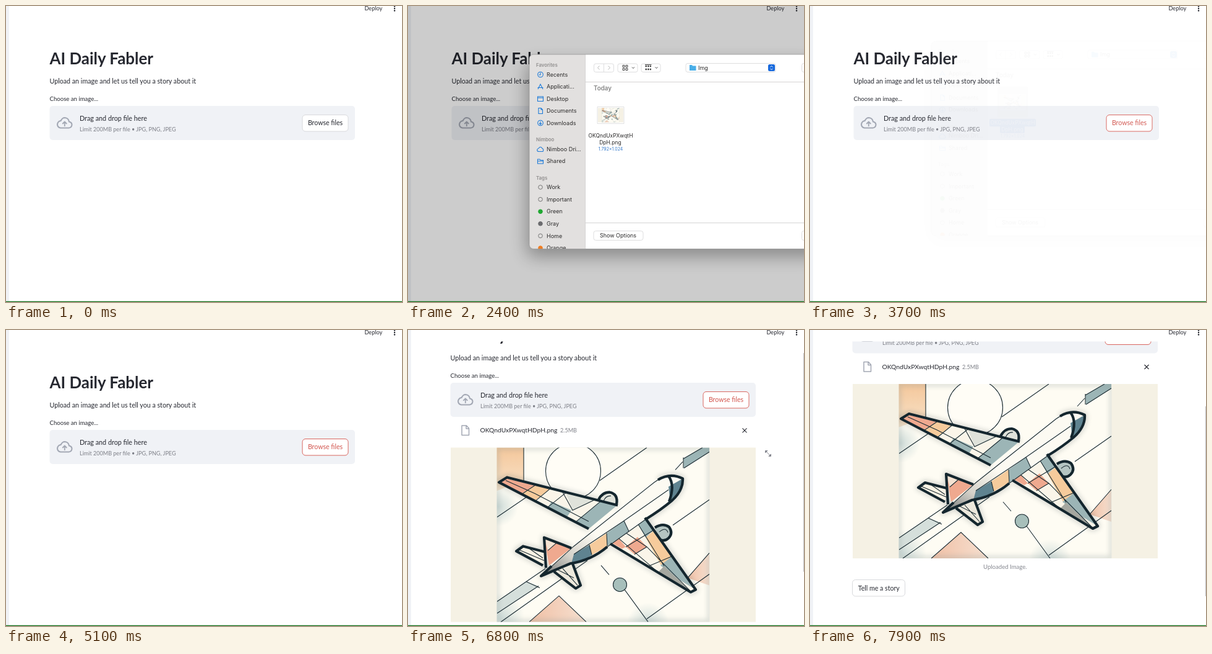
These frames come from a looping animation (640 px wide and 477 px high, 8 s). An HTML page:

```html
<!DOCTYPE html>
<html lang="en">
<head>
<meta charset="utf-8">
<style>
html, body { margin: 0; width: 100%; height: 100%; overflow: hidden; background: #fff }
svg { display: block; width: 640px; height: 477px; font: 10.8px Lato, sans-serif; fill: #262830 }
.small { font-size: 9.6px }
.hint { font-size: 9.05px; fill: #7d7f87 }
.mid { text-anchor: middle }
.finder { font: 9px Inter, sans-serif; fill: #2c2b2b }
.head { font-size: 7.8px; font-weight: 600; fill: #918f8f }
.line { fill: none; stroke: #1b2c33; stroke-width: 1.1 }
.edge { fill: none; stroke: #14262e; stroke-width: 4.2; stroke-linejoin: round }
.blue { fill: none; stroke: #1d7ad8; stroke-width: 1.1 }
.icon { fill: none; stroke: #a3a8b4; stroke-width: 1.8; stroke-linejoin: round }
.peach { fill: #efa98f } .sand { fill: #f6cb9c } .teal { fill: #9cb5b6 } .slate { fill: #5f8390 }
</style>
</head>
<body>
<svg viewBox="0 0 640 477">
<defs>
  <linearGradient id="sandFade" x2="0" y2="1"><stop stop-color="#f4c79b"/><stop offset="1" stop-color="#f8e3c9"/></linearGradient>
  <linearGradient id="peachFade" x2="1" y2="0"><stop stop-color="#f0c0a6"/><stop offset="1" stop-color="#f6e0d0"/></linearGradient>
  <linearGradient id="body" x1="0" y1="1" x2="1" y2="0"><stop stop-color="#6f7373"/><stop offset=".2" stop-color="#d5d2ca"/><stop offset=".4" stop-color="#fcfaf2"/></linearGradient>
  <radialGradient id="tealFade"><stop stop-color="#cfdcd9"/><stop offset="1" stop-color="#cfdcd9" stop-opacity="0"/></radialGradient>
  <filter id="soft" x="-20%" y="-20%" width="140%" height="140%"><feGaussianBlur stdDeviation="4"/></filter>
  <filter id="shade" x="-20%" y="-20%" width="140%" height="140%"><feGaussianBlur stdDeviation="14"/></filter>
  <clipPath id="frame"><path d="M143.500 190H487.500V471H143.500z"/></clipPath>
  <clipPath id="panel"><rect x="196" y="78" width="460" height="313.500" rx="7"/></clipPath>
  <path id="leftWing" d="M339 283L160 238 147 246 292 321"/>
  <path id="rightWing" d="M327 345L457 423 465 419 383 303"/>
  <path id="hull" d="M215 397L268 349 398 246Q420 230 444 240Q445 259 426 276Q408 291 385 305L322 350Q296 372 262 377z"/>
  <path id="fin" d="M223 384L220 335 264 352"/>
  <path id="tailLeft" d="M221 358L186 349 175 357 218 380"/>
  <path id="tailRight" d="M236 390L271 417 279 412 266 377"/>
  <g id="outline">
    <use href="#leftWing"/><use href="#rightWing"/>
    <use href="#tailLeft"/><use href="#tailRight"/><use href="#fin"/>
    <path d="M404 242Q424 230 444 240Q445 259 426 276Q408 291 385 305M322 350Q296 372 262 377L215 397 232 381"/>
  </g>
  <g id="art">
    <path fill="#f5f1e4" d="M69 190H562V471H69z"/>
    <g clip-path="url(#frame)">
      <path fill="#fefcf3" d="M143 190H488V471H143z"/>
      <path fill="url(#sandFade)" d="M143 190H187V243L143 260z"/>
      <circle cx="146" cy="285" r="32" fill="url(#tealFade)"/>
      <circle cx="150" cy="462" r="38" fill="url(#tealFade)"/>
      <circle cx="388" cy="474" r="34" fill="url(#tealFade)"/>
      <path fill="#d5dfdb" d="M143 439L191 406 211 413 143 457z"/>
      <path fill="url(#peachFade)" d="M196 471L244 429 288 471z"/>
      <path fill="url(#peachFade)" d="M487 360V412L452 400z"/>
      <path class="teal" d="M445 208L476 190H487V197L446 223z"/>
      <path fill="none" stroke="#8d9c98" stroke-width="6" opacity=".4" filter="url(#soft)" d="M143 190H488V471H143z"/>
      <path class="line" d="M187 190V243M144 302L200 264M310 243L386 190M445 208L476 190M446 223L487 197M445 206V223M432 226L444 213M428 315L487 274M144 438L222 385M150 471L290 372M191 406L213 416M144 457L211 413M196 471L244 429 288 471M312 380L325 395M350 419L388 471M386 466L487 394M452 400L487 360"/>
      <circle class="line" cx="267" cy="228" r="44.500" style="fill:#fffdf6"/>
      <circle class="line" cx="342.500" cy="411" r="11" style="fill:#a7bfbb"/>
      <use href="#outline" class="edge" filter="url(#soft)" opacity=".22" style="stroke-width:7"/>
      <path class="edge" style="fill:#dfe2da" d="M308 274Q314 262 326 262Q340 265 337 281"/>
      <path class="edge" style="fill:#b5c5c2" d="M399 319Q412 311 422 318Q429 328 421 336Q415 342 405 338"/>
      <path class="line" d="M316 276Q320 267 328 268M406 326Q417 317 420 327"/>
      <use href="#leftWing" fill="#faf5e9"/>
      <path class="peach" d="M149 246L160 240 205 251 184 264z"/>
      <path class="sand" d="M205 251L229 257 206 275 184 264z"/>
      <path class="teal" d="M232 277L264 291 257 302 226 286z"/>
      <path class="teal" d="M338 283L311 277 271 310 292 321z"/>
      <path fill="#dfe2da" d="M255 263L300 275 266 291z"/>
      <path class="line" d="M158 243L205 264 292 309M205 251L184 265M229 257L206 276M255 263L226 286M311 277L271 310M250 262L266 291 300 275"/>
      <use href="#rightWing" fill="#faf5e9"/>
      <path class="teal" d="M371 312L383 303 397 323 384 335z"/>
      <path class="peach" d="M352 350L371 334 386 350 366 362zM330 344L341 337 352 350 346 353z"/>
      <path class="sand" d="M384 335L398 323 427 365 409 380z"/>
      <path class="teal" d="M408 380L427 365 465 419 440 404z"/>
      <path fill="#a5a7a0" d="M404 391L414 381 457 422z"/>
      <path class="line" d="M350 326L386 350 457 422M340 336L404 391M352 350L397 323M366 362L386 350M371 312L414 381M389 381L427 365"/>
      <use href="#hull" fill="url(#body)"/>
      <path class="slate" d="M264 377L268 362 293 347 297 363Q284 373 264 377z"/>
      <path class="sand" d="M293 347L321 328 322 349 297 363z"/>
      <path class="teal" d="M321 328L349 308 357 325 322 349z"/>
      <path class="slate" d="M421 253L444 240Q444 256 424 276z"/>
      <use href="#hull" class="line"/>
      <path class="line" d="M268 362L349 308 421 258M293 347L297 363M321 328L322 349M349 308L357 325"/>
      <use href="#tailLeft" fill="#f8f2e4"/><use href="#tailRight" fill="#ece8dc"/>
      <path class="peach" d="M220 335L264 352 228 380z"/>
      <path fill="#f4e3d3" d="M220 335L241 343 226 356z"/>
      <path class="line" d="M180 355L220 372M195 352L218 368M250 385L274 412M226 356L241 343M240 386L268 400"/>
      <use href="#outline" class="edge"/>
      <path class="edge" d="M421 236Q432 250 422 277"/>
    </g>
  </g>
</defs>

<path fill="#fff" d="M0 0H640V477H0z"/>
<g id="scroll">
  <g id="page">
    <text x="70.500" y="94" font-size="25.900" font-weight="700">AI Daily Fabler</text>
    <text x="70.500" y="125" font-size="10.700">Upload an image and let us tell you a story about it</text>
    <text x="70.500" y="153" class="small">Choose an image...</text>
    <rect x="70.500" y="161" width="493.500" height="55" rx="5" fill="#f0f2f6"/>
    <path class="icon" style="stroke-width:2.100" d="M88 196.500Q83 195.500 83 190.500Q84 185.500 88.500 185Q91 180 95 180Q101 180.500 102 186.500Q106.500 187.500 106.500 191.500Q106 196 101.500 196.500z"/>
    <path class="icon" d="M94.800 194V187M91.300 190L94.800 186.500 98.300 190"/>
    <text x="119" y="185">Drag and drop file here</text>
    <text x="119" y="202" class="hint">Limit 200MB per file • JPG, PNG, JPEG</text>
    <rect id="browse" x="479" y="175.500" width="74" height="26.500" rx="5"/>
    <text id="browseText" x="516" y="192" class="mid" font-size="10.600">Browse files</text>
  </g>
  <g id="file">
    <path class="icon" style="stroke-width:1.500" d="M87 230H94.500L98.500 234.500V245.500H87zM94 230V235H98.500"/>
    <text x="116.500" y="241" font-size="10.300">OKQndUxPXwqtHDpH.png</text>
    <text x="246" y="241" class="hint">2.5MB</text>
    <path class="line" style="stroke:#262830" d="M540.500 234.500L547.500 241.500M547.500 234.500L540.500 241.500"/>
  </g>
  <g id="result">
    <use href="#art" y="75.500"/>
    <path id="expand" fill="#85878f" stroke="#85878f" d="M577.500 270.500H581L577.500 274zM586.500 279.500H583L586.500 276zM578 271L586 279"/>
    <text x="315.300" y="563.500" class="small mid" fill="#85878f">Uploaded Image.</text>
    <rect x="68.500" y="581" width="85" height="26.500" rx="5" fill="#fff" stroke="#d9dadd"/>
    <text x="111.300" y="598" class="mid" font-size="10.600">Tell me a story</text>
  </g>
</g>

<path fill="#fff" d="M0 0H640V18.500H0z"/>
<path fill="#f0f2f6" d="M0 0H5V477H0z"/>
<text x="579.500" y="7" font-size="9.100">Deploy</text>
<g><circle cx="628" cy=".5" r="1.200"/><circle cx="628" cy="4" r="1.200"/><circle cx="628" cy="7.500" r="1.200"/></g>
<g id="running" fill="#b9bac0" font-size="9">
  <path fill="none" stroke="#a9abb2" stroke-width="1.700" d="M462 1L467 3 470 7M467 3L464 8 460.500 10M467 6L472 11M466 0L473 2"/>
  <text x="481" y="7">RUNNING...</text>
  <text x="542" y="7" fill="#85878f">Stop</text>
</g>
<rect id="bar" x="638.800" width="1.200" fill="#c6c6c9"/>

<path id="dim" d="M0 0H640V477H0z" fill="#000"/>
<g id="dialog" class="finder">
  <rect x="192" y="92" width="480" height="312" rx="12" fill="#000" opacity=".32" filter="url(#shade)"/>
  <g clip-path="url(#panel)">
    <path fill="#fff" d="M196 78H640V392H196z"/>
    <path fill="#e2e0df" d="M196 78H286V392H196z"/>
    <path stroke="#d5d4d4" d="M286.500 78V392M287 122.500H640M287 349.500H640"/>
    <g id="side"></g>
    <g class="blue">
      <circle cx="214" cy="110.500" r="4.300"/><path d="M214 107.500V111H211.500"/>
      <path d="M210 134L214 126 218 134M209.500 131.500H218.500"/>
      <path d="M209.500 146H218.500V153.500H209.500zM209.500 148H218.500"/>
      <path d="M211 164.500H215L217.500 167V173.500H211zM215 164.500V167H217.500"/>
      <circle cx="214" cy="188.500" r="4.300"/><path d="M214 186V191M212 189L214 191 216 189"/>
      <path d="M211 234.500Q208 234 209 231Q210 229.500 211 229.500Q214 225 217 229.500Q220 231 218 234.500z"/>
      <path d="M209.500 247H213L214 248.500H218.500V254H209.500zM209.500 250H218.500"/>
    </g>
    <g fill="none" stroke="#dededf">
      <rect x="300.500" y="93" width="32" height="13.500" rx="3"/><path d="M316.500 93V106.500"/>
      <rect x="339" y="93" width="32" height="13.500" rx="3"/>
      <rect x="377" y="93" width="31" height="13.500" rx="3"/>
      <rect x="449" y="92.500" width="145" height="14" rx="3"/>
      <rect x="300" y="362.500" width="80" height="15" rx="3.500"/>
      <rect x="636.500" y="92.500" width="40" height="14" rx="3"/><rect x="636.500" y="362.500" width="40" height="15" rx="3"/>
    </g>
    <path fill="none" stroke="#b5b5b5" d="M309.500 96.500L306.500 99.500 309.500 102.500M323.500 96.500L326.500 99.500 323.500 102.500"/>
    <path fill="none" stroke="#444" d="M347 95.500H350V98.500H347zM352 95.500H355V98.500H352zM347 100.500H350V103.500H347zM352 100.500H355V103.500H352zM362 98.500L364 100.500 366 98.500M399.500 98.500L401.500 100.500 403.500 98.500"/>
    <path fill="none" stroke="#444" stroke-width="2.500" stroke-dasharray="2.500 1.200" d="M383.500 97H393M383.500 102H393"/><path stroke="#444" d="M383 94.500H393.500"/>
    <path fill="#49aee8" d="M455 95H459L460 96.500H465.500V104H455z"/>
    <text x="469" y="102.500">Img</text>
    <rect x="582" y="94" width="11" height="11" rx="2.500" fill="#1769dd"/>
    <path fill="none" stroke="#fff" d="M585.500 98.500L587.500 96.500 589.500 98.500M585.500 100.800L587.500 102.800 589.500 100.800"/>
    <text x="300" y="136" font-size="9.800" font-weight="600" fill="#858585">Today</text>
    <rect id="thumbBack" x="303" y="151.500" width="49.500" height="49.500" rx="3" fill="#dcdcdc"/>
    <path fill="#fff" stroke="#cfcfcf" stroke-width=".6" d="M306 162.500H349V189.500H306z"/>
    <use href="#art" transform="translate(301.300 148.400) scale(.083)"/>
    <g id="nameBack" fill="#0a5cd8"><rect x="290" y="203" width="75" height="12.500" rx="2"/><rect x="307" y="214" width="40" height="12" rx="2"/></g>
    <g id="name" class="mid" font-size="8.500"><text x="327.500" y="212.300">OKQndUxPXwqtH</text><text x="327" y="223.300">DpH.png</text></g>
    <text x="327.500" y="233.300" class="mid" font-size="7" fill="#2f76c9">1.792×1.024</text>
    <text x="339.500" y="373.300" class="mid">Show Options</text>
  </g>
  <rect x="196" y="78" width="460" height="313.500" rx="7" fill="none" stroke="#8d8d8d" stroke-width=".7"/>
</g>
<path fill="#13701a" d="M0 475.700H640V477H0z"/>
</svg>
<script>
const $ = id => document.getElementById(id);
const clamp = x => Math.max(0, Math.min(1, x));
const ramp = (t, start, end) => clamp((t - start) / (end - start));
const ease = u => u * u * (3 - 2 * u);
const set = (id, attrs) => { for (const k in attrs) $(id).setAttribute(k, attrs[k]); };
const show = (id, on) => $(id).style.display = on ? '' : 'none';

function label(y, text, head) {
  return `<text x="${head ? 207 : 224}" y="${y + 3.2}" class="${head ? 'head' : ''}">${text}</text>`;
}
const places = ['Recents', 'Applicati...', 'Desktop', 'Documents', 'Downloads'];
const tags = [['Work'], ['Important'], ['Green', '#20a831'], ['Gray', '#6b6b6e'], ['Home'], ['Orange', '#ef7d22']];
$('side').innerHTML = label(94.5, 'Favorites', true)
  + places.map((s, i) => label(110.5 + i * 19.5, s)).join('')
  + label(215, 'Nimboo', true) + label(230.5, 'Nimboo Dri...') + label(250, 'Shared')
  + label(276.5, 'Tags', true)
  + tags.map(([s, color], i) => {
    const y = 292 + i * 19.6;
    return `<circle cx="214" cy="${y}" r="3.3" fill="${color || 'none'}" stroke="${color || '#777'}"/>` + label(y, s);
  }).join('');

const buttonLooks = {
  idle: ['#fff', '#d9dadd', '#262830'],
  hover: ['#fff', '#d9665f', '#d2554e'],
  down: ['#ff4b4b', '#ff4b4b', '#fff']
};

function draw(now) {
  const t = now % 8000;

  const [fill, stroke, ink] = buttonLooks[t < 1450 ? 'idle' : t > 1750 && t < 2150 ? 'down' : 'hover'];
  set('browse', { fill, stroke });
  set('browseText', { fill: ink });

  const open = ramp(t, 2250, 2390) * (1 - ramp(t, 3500, 3708));
  set('dim', { opacity: open > .1 ? .2 * open : 0 });
  set('dialog', { opacity: open, transform: `translate(0 ${-22 * (1 - open)})` });
  show('dialog', open > 0);
  const picked = t > 2950;
  show('thumbBack', picked);
  show('nameBack', picked);
  set('name', { fill: picked ? '#fff' : '#2c2b2b' });

  const loaded = t > 5450;
  set('page', { transform: `translate(${loaded ? -2 : 0} 0)` });
  show('file', loaded);
  show('running', loaded && t < 6250);
  show('result', t > 5650);
  show('expand', t < 7300);

  const u = ease(ramp(t, 6400, 7290));
  set('scroll', { transform: `translate(0 ${-178.5 * u})` });
  show('bar', t > 5650);
  set('bar', { y: 18 + 105 * u * u, height: 387 - 81 * u });
}

function tick() {
  draw(performance.now());
  requestAnimationFrame(tick);
}
tick();
</script>
</body>
</html>
```
